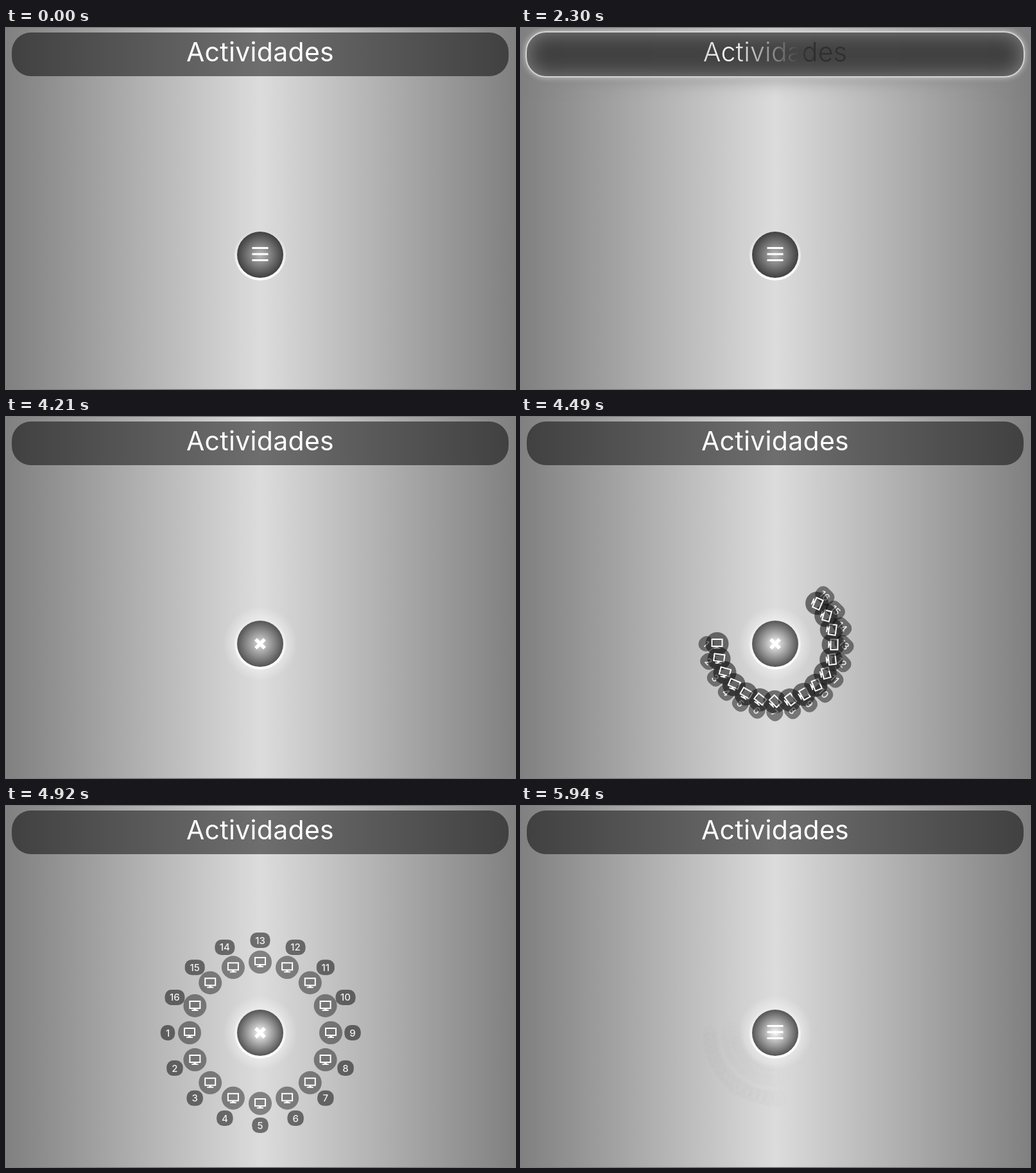
An HTML page for the animation above (6.04 s loop, 793 px wide and 562 px high).

```html
<!DOCTYPE html>
<html lang="es">
<head>
<meta charset="utf-8">
<title>Actividades</title>
<style>
  html, body { margin: 0; width: 100%; height: 100%; overflow: hidden; }
  body { position: relative; background: linear-gradient(90deg, #808080, #dcdcdc, #808080); }
  #bar {
    position: absolute; left: 7px; top: 5px; width: 778px; height: 72px;
    box-sizing: border-box; border: 2px solid transparent; border-radius: 32px;
    background-clip: padding-box;
  }
  svg { position: absolute; left: 0; top: 0; display: block; }
  text { font-family: Inter, "Open Sans", sans-serif; text-anchor: middle; }
  .num { font-size: 15px; font-weight: 500; fill: #f2f2f2; }
</style>
</head>
<body>
<div id="bar"></div>
<svg width="793" height="562" viewBox="0 0 793 562">
  <defs>
    <linearGradient id="beam" gradientUnits="userSpaceOnUse" y1="0" y2="0">
      <stop offset="0"/><stop offset=".625"/><stop offset="1"/>
    </linearGradient>
    <linearGradient id="rim" x1="0" y1="0" x2="0" y2="1">
      <stop offset="0" stop-color="#fff" stop-opacity="0"/>
      <stop offset="1" stop-color="#fff"/>
    </linearGradient>
    <radialGradient id="face"><stop offset="0"/><stop offset="1"/></radialGradient>
    <radialGradient id="halo">
      <stop offset=".66" stop-color="#fff" stop-opacity=".4"/>
      <stop offset="1" stop-color="#fff" stop-opacity="0"/>
    </radialGradient>
  </defs>
  <text id="title" x="396" y="52" font-size="41" letter-spacing=".3" fill="url(#beam)">Actividades</text>
  <g transform="translate(396 353)">
    <circle id="glow" r="58" fill="url(#halo)"/>
    <g id="menu"></g>
    <circle r="40" fill="url(#rim)"/>
    <circle r="36" fill="url(#face)"/>
    <path id="bars" d="M-12.5-10.5h25M-12.5-1h25M-12.5 8.5h25" stroke="#fff" stroke-width="3"/>
    <path id="cross" d="M-7-7 7 7M7-7-7 7" stroke="#fff" stroke-width="5.6"/>
  </g>
</svg>
<script>
const LOOP = 6040, COUNT = 16, STEP = 360 / COUNT;
const $ = id => document.getElementById(id);
const clamp = x => Math.max(0, Math.min(1, x));
const span = (t, a, b) => clamp((t - a) / (b - a));
const mix = (a, b, k) => a + (b - a) * k;
const gray = v => { v = Math.round(v); return `rgb(${v},${v},${v})`; };
const show = (el, on) => el.setAttribute('visibility', on ? 'visible' : 'hidden');

// cubic-bezier(.25, .1, .25, 1)
const bez = (a, b, s) => 3 * a * s * (1 - s) ** 2 + 3 * b * s * s * (1 - s) + s ** 3;
function ease(x) {
  if (x <= 0 || x >= 1) return clamp(x);
  let lo = 0, hi = 1;
  for (let i = 0; i < 20; i++) {
    const m = (lo + hi) / 2;
    if (bez(.25, .25, m) < x) lo = m; else hi = m;
  }
  return bez(.1, 1, lo);
}

function make(tag, attrs, parent) {
  const el = document.createElementNS('http://www.w3.org/2000/svg', tag);
  for (const k in attrs) el.setAttribute(k, attrs[k]);
  parent.appendChild(el);
  return el;
}

const items = Array.from({ length: COUNT }, (_, i) => {
  const name = String(i + 1);
  const w = [...name].reduce((s, c) => s + (c === '1' ? 5.5 : 8.5), 17);
  const root = make('g', {}, $('menu'));
  const label = make('g', {}, root);
  const pill = make('rect', { x: -w / 2, y: -12, width: w, height: 24, rx: 10.5 }, label);
  make('text', { class: 'num', y: 5.5 }, label).textContent = name;
  const icon = make('g', {}, root);
  const disc = make('circle', { r: 18 }, icon);
  make('path', { d: 'M-8-7H8V4H-8Z', fill: 'none', stroke: '#fff', 'stroke-width': 2 }, icon);
  make('path', { d: 'M-2 5H2V6.2H5V8H-5V6.2H-2Z', fill: '#fff' }, icon);
  return { root, label, pill, icon, disc, turn: i * STEP };
});

function drawBar(t) {
  const over = t >= 1350 && t < 3530;
  const k = over ? ease(span(t, 1350, 1940)) : 0;
  const s = $('bar').style;
  s.backgroundColor = `rgba(${[0, 0, 0].map(v => Math.round(mix(v, 62, k)))},${mix(.5, .97, k)})`;
  s.borderColor = `rgba(211,211,211,${k})`;
  s.boxShadow = `0 0 10px rgba(225,225,225,${.75 * k}), 0 4px 28px rgba(128,128,128,${.7 * k}), ` +
    `inset 0 0 30px rgba(160,160,160,${.7 * k})`;

  const base = over ? mix(255, 46, k) : t < 1350 ? 255 : mix(46, 255, ease(span(t, 3530, 3950)));
  const peak = 325 + .45 * (t - 2300);
  const beam = $('beam'), stops = beam.children;
  beam.setAttribute('x1', peak - 200);
  beam.setAttribute('x2', peak + 120);
  [0, 1, 2].forEach(i =>
    stops[i].setAttribute('stop-color', gray(i === 1 && over ? mix(base, 255, k) : base)));
  $('title').setAttribute('font-weight', over ? 300 : 400);
}

function drawButton(t) {
  const h = .5 * ease(span(t, 3530, 3950)) + .5 * ease(span(t, 4210, 4680));
  const stops = $('face').children;
  stops[0].setAttribute('stop-color', gray(mix(184, 250, h)));
  stops[1].setAttribute('stop-color', gray(mix(64, 84, clamp(h * 2))));
  $('glow').setAttribute('opacity', span(t, 4070, 4200));
  const open = t >= 4090 && t < 5770;
  show($('cross'), open);
  show($('bars'), !open);
}

function drawMenu(t) {
  const closing = t >= 5760;
  const u = span(t, 4220, 4920);
  const c = span(t, 5760, 6180);
  const p = closing ? 1 - ease(c) : ease(u);
  const slide = 1 - (1 - span(u, .64, 1)) ** 2;
  const alpha = closing ? clamp(1 - c / .48) ** 2 : clamp(u * 3);
  show($('menu'), alpha > 0);
  $('menu').setAttribute('opacity', 1);
  const r = mix(52, 110, p);
  const far = r + mix(17, 34, slide);
  for (const it of items) {
    const a = (180 - it.turn * p) * Math.PI / 180;
    const spin = it.turn * (1 - p);
    const place = (el, d, rot) =>
      el.setAttribute('transform', `translate(${d * Math.cos(a)} ${d * Math.sin(a)}) rotate(${rot})`);
    place(it.icon, r, spin);
    place(it.label, far, spin * slide + 45 * (1 - slide));
    it.root.setAttribute('opacity', alpha);
    it.disc.setAttribute('fill-opacity', mix(.5, .41, slide));
    it.pill.setAttribute('fill-opacity', mix(.45, .5, slide));
  }
}

function draw(t) {
  drawBar(t);
  drawButton(t);
  drawMenu(t);
}

const start = performance.now();
function tick() {
  draw((performance.now() - start) % LOOP);
  requestAnimationFrame(tick);
}
draw(0);
requestAnimationFrame(tick);
</script>
</body>
</html>
```
